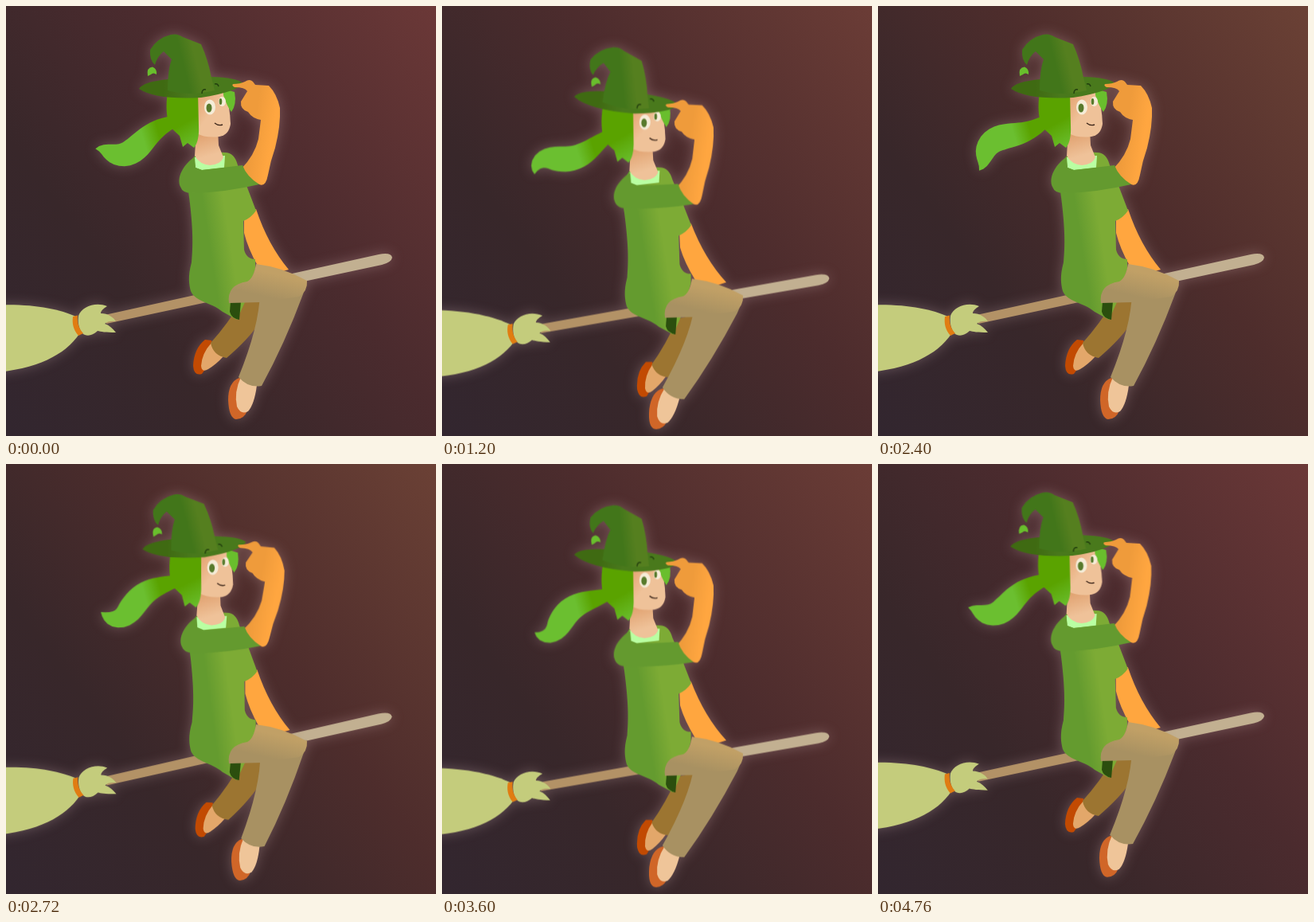
Write an HTML page that moves like this. It is 540 px wide and 540 px high and loops after 4.8 s.

```html
<!DOCTYPE html>
<html lang="en">
<head>
<meta charset="utf-8">
<title>Witch on a broom</title>
<style>
  html, body { margin: 0; width: 100%; height: 100%; overflow: hidden; }
  svg { display: block; width: 100vw; height: 100vh; }
  #witch { filter: drop-shadow(0 0 8px rgba(255, 220, 225, .25)); }
</style>
</head>
<body>
<svg viewBox="0 0 540 540">
  <defs id="defs"></defs>
  <g id="witch">
    <g id="broom">
      <path fill="url(#stickFill)" d="M124 388L468 312Q484 309 485 316Q484 322 472 325L126 399Z"/>
      <path fill="#c4cc7c" d="M-20 376C30 373 65 380 88 390L92 412C74 438 40 456 -20 461Z"/>
      <path fill="#c4cc7c" d="M91 389C95 378 112 371 127 377C122 380 119 383 119 386C128 386 135 391 138 396C132 395 127 396 124 399C130 401 134 405 138 410C125 410 119 409 115 408C108 415 100 415 96 411C91 405 90 396 91 389Z"/>
      <path fill="#e07c12" d="M84 390L90 388.500C89 398 92 406 97 411L91 414C84 406 83 398 84 390Z"/>
    </g>

    <g id="backLeg">
      <path fill="#c24a02" d="M250 419Q236 430 235 452Q236 465 246 462L262 440L258 420Z"/>
      <path fill="#e3a76a" d="M258 423Q246 436 245 452Q246 461 254 456Q264 450 273 440Q262 436 258 423Z"/>
      <path fill="#9c7531" d="M296 370L320 368L318 398Q305 418 277 442Q260 439 257 423Q278 400 296 370Z"/>
    </g>

    <g id="torso">
      <path id="lowArm" fill="#ffa63f" d="M299 264L314 255Q329 300 355 331L336 336L316 326Q304 305 299 285Z"/>
      <path fill="url(#shirtFill)" d="M237 188C228 200 228 225 230 240C235 280 235 300 233 322C228 340 230 350 232 358C238 372 258 372 272 384L290 394L300 372L313 330L313 318Q302 318 299 306L298 270Q308 266 314 257L303 228L291 200Q287 184 275 184Q255 182 237 188Z"/>
      <path fill="#2b4e0e" d="M282 371L295 371L293 394Q283 392 281 384Z"/>
      <path fill="#b9ffa2" d="M237 190L238 203L246 206L274 203L275 188Z"/>
      <path fill="url(#neckFill)" d="M239 155L237 188Q243 199 256 200Q270 199 273 190L267 175L266 155Z"/>

      <g id="head">
        <path id="tail" fill="url(#tailFill)"/>
        <path fill="url(#faceFill)" d="M238 108L275 106Q281 125 282 148Q280 162 268 164Q250 166 240 160Z"/>
        <path fill="#69be2d" d="M273 104L287 108Q290 124 283 133Q277 125 273 112Z"/>
        <path fill="url(#hairFill)" d="M203 108Q199 135 206 152L218 163L222 177L228 172L236 178Q243 170 242 150L241 108Z"/>
        <g id="eyes">
          <ellipse cx="256" cy="127" rx="7" ry="9.500" fill="#f5ecd8"/>
          <ellipse cx="255" cy="128" rx="3.500" ry="5.500" fill="#587a2c"/>
          <ellipse cx="271.500" cy="120" rx="4.500" ry="6" fill="#f5ecd8"/>
          <ellipse cx="269.500" cy="120" rx="1.800" ry="4" fill="#587a2c"/>
        </g>
        <path d="M262 147Q267 151 272 149" fill="none" stroke="#3a2418" stroke-width="1.400"/>
        <g id="hat">
          <path fill="url(#brimFill)" d="M167 104Q172 95 204 92L258 89Q290 90 297 97Q290 108 245 115Q188 118 167 104Z"/>
          <path fill="url(#hatFill)" d="M203 106Q203 80 208 67L198 57Q190 63 187 74Q180 68 181 55Q190 40 207 36Q215 34 222 39L245 48Q254 68 258 90L262 106Q230 114 203 106Z"/>
          <path id="leaf" fill="#69be2d" d="M178 88Q176 77 184 76.500Q190 79 189 86Q185 83 182 86Z"/>
        </g>
        <path fill="none" stroke="#23400e" stroke-width="1.500" d="M246 110Q246 104 251 105M262 98Q266 97 267 101"/>
      </g>

      <g id="upperArm">
        <path id="forearm" fill="url(#armFill)" d="M285 98Q294 98 300 95Q306 91 310 95L313 99L330 100Q340 110 344 128Q345 150 338 178Q332 195 329 212Q326 228 318 224Q303 218 295 205Q312 188 317 167L320 143Q309 141 304 133Q294 130 295 120L303 107Q300 102 287 102Q283 100 285 98Z"/>
        <path fill="#649a2f" d="M236 190C222 200 214 216 219 227Q222 236 236 235Q275 234 318 224Q302 214 297 200L246 206L238 203Z"/>
      </g>
    </g>

    <g id="frontLeg">
      <path fill="#d06628" d="M293 467Q279 472 279 495Q280 518 289 519Q299 519 303 508L315 476Z"/>
      <path fill="#efc599" d="M295 466Q286 485 290 503Q295 514 304 509Q312 500 315 476Z"/>
      <path fill="#a89162" d="M319 360Q318 402 292 466Q304 480 321 477Q350 424 373 362L378 345L330 345Z"/>
    </g>
    <path fill="url(#thighFill)" d="M314 324Q348 328 378 345Q379 358 368 365L320 372L280 373Q277 350 303 346Q311 342 314 324Z"/>
  </g>
</svg>
<script>
const LOOP = 4800, TAU = Math.PI * 2, DEG = Math.PI / 180;
const $ = id => document.getElementById(id);

// x1, y1, x2, y2, first colour, second colour
const gradients = {
  tailFill: [172, 166, 192, 160, '#6bbf30', '#5aa300'],
  hairFill: [226, 146, 242, 174, '#5aa300', '#69be2d'],
  stickFill: [240, 364, 375, 336, '#b39266', '#c2b091'],
  shirtFill: [254, 290, 280, 286, '#649b2f', '#7dab35'],
  neckFill: [248, 162, 256, 188, '#e2a473', '#efc299'],
  thighFill: [345, 338, 338, 368, '#c1a066', '#a89162'],
  faceFill: [240, 120, 258, 134, '#e7a878', '#efc299'],
  hatFill: [222, 70, 238, 66, '#42761a', '#557f1f'],
  brimFill: [198, 100, 230, 102, '#3f6a12', '#49791c'],
  armFill: [310, 160, 334, 164, '#ef9b3b', '#ffa640']
};
$('defs').innerHTML = Object.entries(gradients).map(([id, [x1, y1, x2, y2, a, b]]) =>
  `<linearGradient id="${id}" gradientUnits="userSpaceOnUse" x1="${x1}" y1="${y1}" x2="${x2}" y2="${y2}">
   <stop stop-color="${a}"/><stop offset="1" stop-color="${b}"/></linearGradient>`).join('');

// Nested joints: pivot x, y, degrees turned with the drop, degrees turned with the sway
const joints = {
  broom: [290, 355, 2.3, -1.2],
  backLeg: [330, 375, -7, -1],
  frontLeg: [327, 345, 7.3, -3.7],
  torso: [290, 370, -.5, 1.1],
  lowArm: [305, 262, -2, -.7],
  head: [255, 180, 1, .6],
  hat: [232, 100, 7, -4.5],
  leaf: [186, 50, -14, -3],
  upperArm: [232, 215, 4.4, 0],
  forearm: [318, 222, -4.5, 2.3]
};

// A chain of short steps whose heading ripples more strongly towards the tip
function tailPath(phase) {
  const steps = 24, length = 110, top = [], bottom = [];
  let x = 208, y = 146;
  for (let i = 0; i <= steps; i++) {
    const u = i / steps;
    const heading = DEG * (28 + (10 + 60 * u * u) * Math.cos(phase + DEG * (388 * u - 128)));
    const dx = -Math.cos(heading), dy = Math.sin(heading);
    const half = (8 + 20 * u) * (1 - u ** 3);
    top.push([x - dy * half, y + dx * half]);
    bottom.unshift([x + dy * half, y - dx * half]);
    x += dx * length / steps;
    y += dy * length / steps;
  }
  return `M${[...top, ...bottom].map(p => p.map(v => v.toFixed(1))).join('L')}Z`;
}

function draw(t) {
  const q = t / LOOP * TAU;
  const drop = (1 - Math.cos(2 * q)) / 2, sway = Math.sin(2 * q);
  $('witch').setAttribute('transform', `translate(0 ${18.5 * drop})`);
  for (const [id, [x, y, a, b]] of Object.entries(joints))
    $(id).setAttribute('transform', `rotate(${a * drop + b * sway} ${x} ${y})`);
  $('tail').setAttribute('d', tailPath(5 * q));

  const open = Math.min(1, Math.max(.08, Math.abs(t - 3000) / 100));
  $('eyes').setAttribute('transform', `translate(0 ${127 * (1 - open)}) scale(1 ${open})`);

  const warm = (1 - Math.cos(q)) / 2;
  document.body.style.background = `linear-gradient(53deg, #32262f, #38272a 30%,
    rgb(${75 + 3 * warm} ${43 + 2 * warm} ${46 - 2 * warm}) 60%, rgb(107 ${56 + 9 * warm} ${55 - 2 * warm}))`;
}

function frame() {
  draw(performance.now() % LOOP);
  requestAnimationFrame(frame);
}
frame();
</script>
</body>
</html>
```
